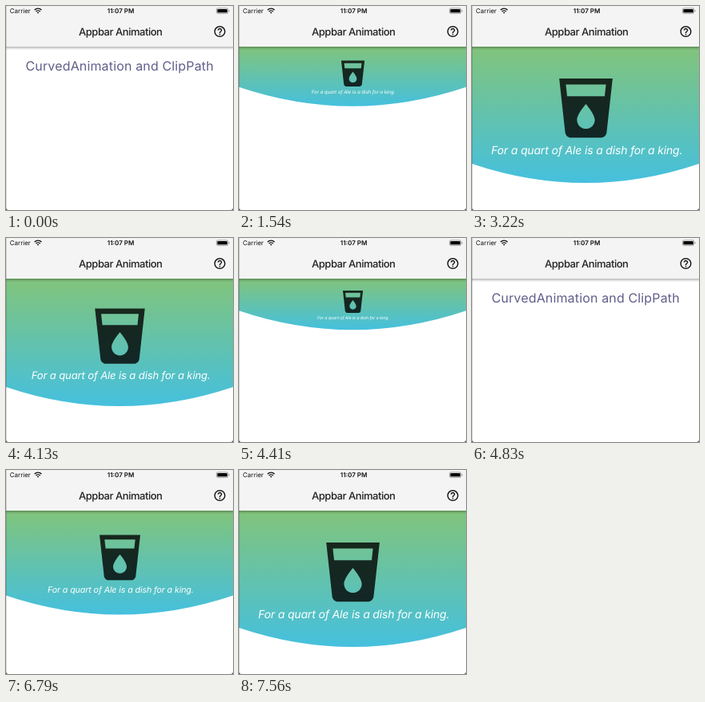
Recreate the animation shown at these times as an HTML page. Size 284 by 256 pixels, loop 8000 ms.

```html
<!DOCTYPE html>
<html lang="en">
<head>
<meta charset="utf-8">
<title>Appbar Animation</title>
<style>
  html, body { margin: 0; width: 100%; height: 100%; overflow: hidden; background: #fff; }
  svg { display: block; width: 284px; height: 256px; }
  text { font-family: Inter, Roboto, sans-serif; text-rendering: geometricPrecision; }
  .status { font-size: 8px; fill: #111; }
  .title { font-size: 13px; font-weight: 500; letter-spacing: -.47px; fill: #222; }
  .heading { font-size: 16px; letter-spacing: .15px; fill: #605e89; }
  .quote { font-size: 14px; font-style: italic; letter-spacing: -.16px; fill: #fff; }
</style>
</head>
<body>
<svg viewBox="0 0 284 256">
  <defs>
    <linearGradient id="fill" gradientUnits="userSpaceOnUse" x1="0" x2="0" y1="51" y2="222">
      <stop offset="0" stop-color="#81c47b"/>
      <stop offset="1" stop-color="#45c0de"/>
    </linearGradient>
    <linearGradient id="shade" x1="0" x2="0" y1="0" y2="1">
      <stop offset="0" stop-opacity=".3"/>
      <stop offset=".45" stop-opacity=".12"/>
      <stop offset="1" stop-opacity="0"/>
    </linearGradient>
  </defs>

  <rect width="284" height="256" fill="#fff"/>
  <text class="heading" x="24.5" y="80.5">CurvedAnimation and ClipPath</text>

  <path id="panel" fill="url(#fill)"/>
  <g id="content">
    <path transform="translate(98 83.6) scale(3.71)" fill="#000" fill-opacity=".8" fill-rule="evenodd"
      d="M3 2l2.01 18.23C5.13 21.23 5.97 22 7 22h10c1.03 0 1.87-.77 1.99-1.77L21 2H3zm9 17c-1.66 0-3-1.34-3-3 0-2 3-5.4 3-5.4s3 3.4 3 5.4c0 1.66-1.34 3-3 3zm6.33-11H5.67l-.44-4h13.53l-.43 4z"/>
    <text class="quote" x="24" y="186">For a quart of Ale is a dish for a king.</text>
  </g>

  <!-- app bar -->
  <rect y="51" width="284" height="4.5" fill="url(#shade)"/>
  <rect width="284" height="51" fill="#f4f4f4"/>
  <text class="status" x="4.7" y="9">Carrier</text>
  <g fill="none" stroke="#111" stroke-width="1.4">
    <path d="M35.7 5a6.2 6.2 0 0 1 8.8 0M37.5 6.9a3.7 3.7 0 0 1 5.2 0"/>
    <path d="M40.1 9.6l-1.3-1.4a1.9 1.9 0 0 1 2.6 0z" fill="#111" stroke="none"/>
  </g>
  <text class="status" x="126.8" y="9" font-weight="600">11:07 PM</text>
  <rect x="263.4" y="2.9" width="14.4" height="6.4" rx="1.7" fill="none" stroke="#777" stroke-width=".7"/>
  <rect x="264.4" y="3.9" width="12.4" height="4.4" rx=".9" fill="#000"/>
  <path d="M278.7 5v2.2q1-.3 1-1.1t-1-1.1" fill="#777"/>
  <text class="title" x="91" y="36.6">Appbar Animation</text>
  <path transform="translate(259.1 23.6) scale(.7)" fill="#111"
    d="M11 18h2v-2h-2v2zm1-16C6.48 2 2 6.48 2 12s4.48 10 10 10 10-4.48 10-10S17.52 2 12 2zm0 18c-4.41 0-8-3.59-8-8s3.59-8 8-8 8 3.59 8 8-3.59 8-8 8zm0-14c-2.21 0-4 1.79-4 4h2c0-1.1.9-2 2-2s2 .9 2 2c0 2-3 1.75-3 5h2c0-2.25 3-2.5 3-5 0-2.21-1.79-4-4-4z"/>

  <!-- window edge -->
  <rect width="1" height="256" fill="#000" fill-opacity=".14"/>
  <path d="M0 253v3h3q-3 0-3-3M284 253v3h-3q3 0 3-3" fill="#333"/>
</svg>

<script>
const LOOP = 8000, STEP = 70, TOP = 51, HEIGHT = 171, SAG = 24, MID = 142.5;
const [panel, content, fill] = ['panel', 'content', 'fill'].map(id => document.getElementById(id));

// Ease with control points (x1, 0) and (x2, 1).
const ease = (x1, x2) => u => {
  let lo = 0, hi = 1, s = .5;
  for (let i = 0; i < 24; i++) {
    s = (lo + hi) / 2;
    const x = 3 * s * (1 - s) * ((1 - s) * x1 + s * x2) + s ** 3;
    if (x < u) lo = s; else hi = s;
  }
  return s * s * (3 - 2 * s);
};
const inOut = ease(.42, .58);

const moves = [
  { start: 1262, span: 600, from: 0, to: 1, curve: inOut },
  { start: 4010, span: 650, from: 1, to: 0, curve: ease(.42, .68) },
  { start: 6392, span: 600, from: 0, to: 1, curve: inOut }
];

function openness(t) {
  const m = moves.findLast(m => t >= m.start);
  if (!m) return 0;
  const u = (t - m.start) / m.span;
  return u >= 1 ? m.to : m.from + (m.to - m.from) * m.curve(u);
}

function draw(p) {
  const bottom = TOP + HEIGHT * p, edge = bottom - SAG;
  panel.setAttribute('d', `M0 ${TOP}H284V${edge}Q142 ${bottom + SAG} 0 ${edge}Z`);
  fill.setAttribute('y2', bottom);
  content.setAttribute('transform', `translate(${MID} ${TOP}) scale(${p}) translate(${-MID} ${-TOP})`);
}

const begin = performance.now();
function tick() {
  const t = (performance.now() - begin) % LOOP;
  draw(openness(Math.floor(t / STEP) * STEP));
  requestAnimationFrame(tick);
}
tick();
</script>
</body>
</html>
```
